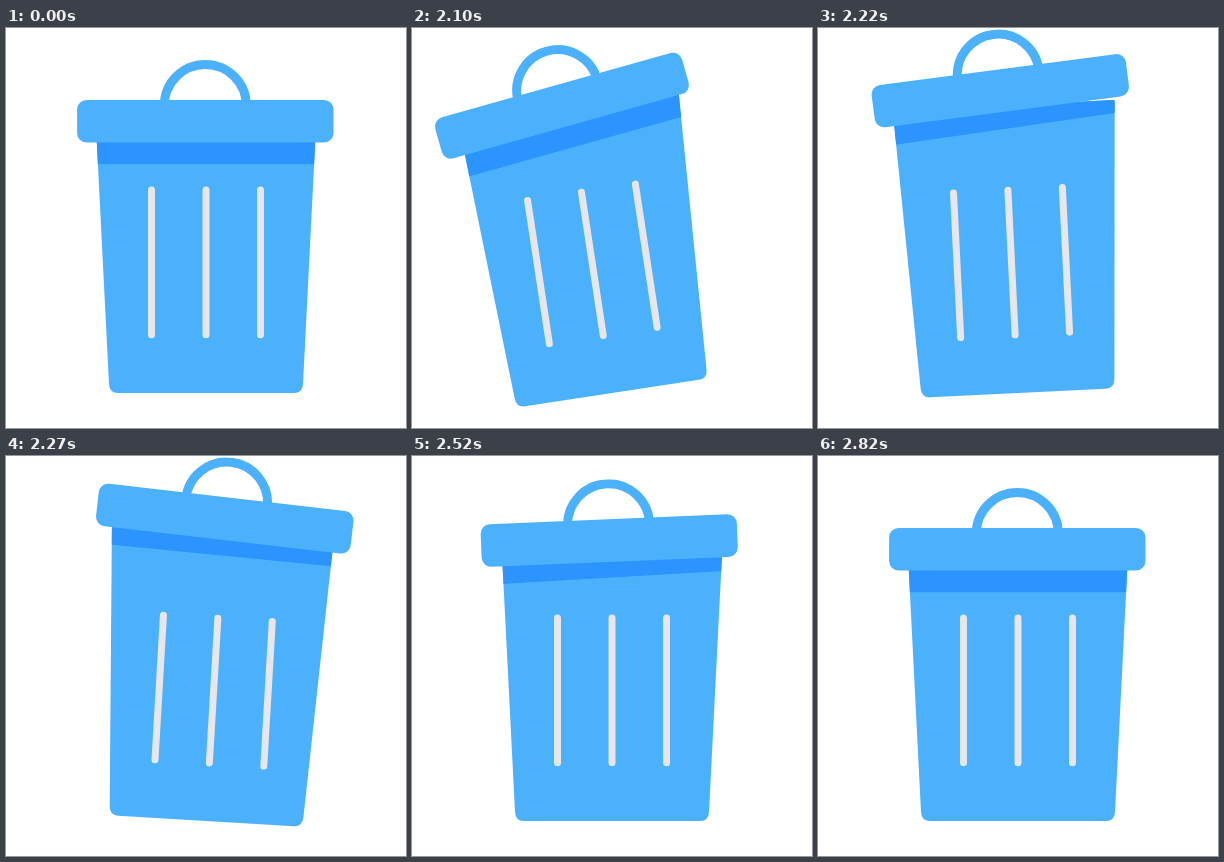
An HTML page that plays this animation: 400 by 400 pixels, repeating every 2850 ms.

```html
<!DOCTYPE html>
<html lang="en">
<head>
<meta charset="utf-8">
<title>Trash can</title>
<style>
  html, body { margin: 0; height: 100%; overflow: hidden; background: #fff; }
  svg { display: block; width: 100%; height: 100%; }
</style>
</head>
<body>
<svg viewBox="0 0 400 400" fill="#4bb1fd">
  <path id="can" d="M90 77H310Q311 77 311 79L297 356Q296.5 365 288 365H112Q103.5 365 103 356L89 79Q89 77 90 77Z"/>
  <clipPath id="inside"><use href="#can"/></clipPath>
  <g clip-path="url(#inside)">
    <rect id="shade" x="-250" y="-200" width="500" height="200" fill="#2b94fe"/>
  </g>
  <path id="ribs" d="M145.5 162V306.8M200 162V306.8M254.5 162V306.8" stroke="#e7e6eb" stroke-width="7" stroke-linecap="round"/>
  <!-- lid, drawn around its own centre -->
  <g id="lid">
    <circle cy="-15.7" r="41" fill="none" stroke="#4bb1fd" stroke-width="9" clip-path="inset(0 0 50% 0)"/>
    <rect x="-128.2" y="-21.3" width="256.4" height="42.6" rx="9.5"/>
  </g>
</svg>
<script>
const LOOP = 2850, START = 2020;
const [can, ribs, shade, lid] = ['can', 'ribs', 'shade', 'lid'].map(id => document.getElementById(id));
const pose = (part, transform) => part.setAttribute('transform', transform);

// Rest until START, then advance in alternating 30 ms and 20 ms steps.
function stepTime(t) {
  if (t < START) return 0;
  const d = t - START;
  return START + Math.floor(d / 50) * 50 + (d % 50 >= 30 ? 30 : 0);
}

function draw(now) {
  const t = stepTime(now % LOOP);
  // Smooth 0 to 1 between two times.
  const ease = (from, to) => {
    const p = Math.min(1, Math.max(0, (t - from) / (to - from)));
    return p * p * (3 - 2 * p);
  };

  // The can swings left, right and back; the lid follows with more overshoot.
  const sway = -10 * ease(1933, 2150) + 14 * ease(2150, 2288) - 4 * ease(2288, 2455);
  const x = 199.3 - 58 * ease(1945, 2150) + 82 * ease(2150, 2290) - 27 * ease(2290, 2415) + 3 * ease(2415, 2700);
  const y = 93.2 - 31 * (ease(1960, 2240) - ease(2240, 2670));
  const turn = -19 * ease(1962, 2150) + 35 * ease(2150, 2332) - 18.5 * ease(2332, 2530) + 2.5 * ease(2530, 2700);
  const squeeze = ease(2120, 2270) - ease(2530, 2700);

  const lidPose = `translate(${x} ${y}) rotate(${turn})`;
  for (const part of [can, ribs]) pose(part, `rotate(${sway} 200 365)`);
  pose(lid, lidPose);
  pose(shade, `${lidPose} translate(0 ${43 - 6 * squeeze}) rotate(${-squeeze})`);
}

const begin = performance.now();
function tick() {
  draw(performance.now() - begin);
  requestAnimationFrame(tick);
}
tick();
</script>
</body>
</html>
```
